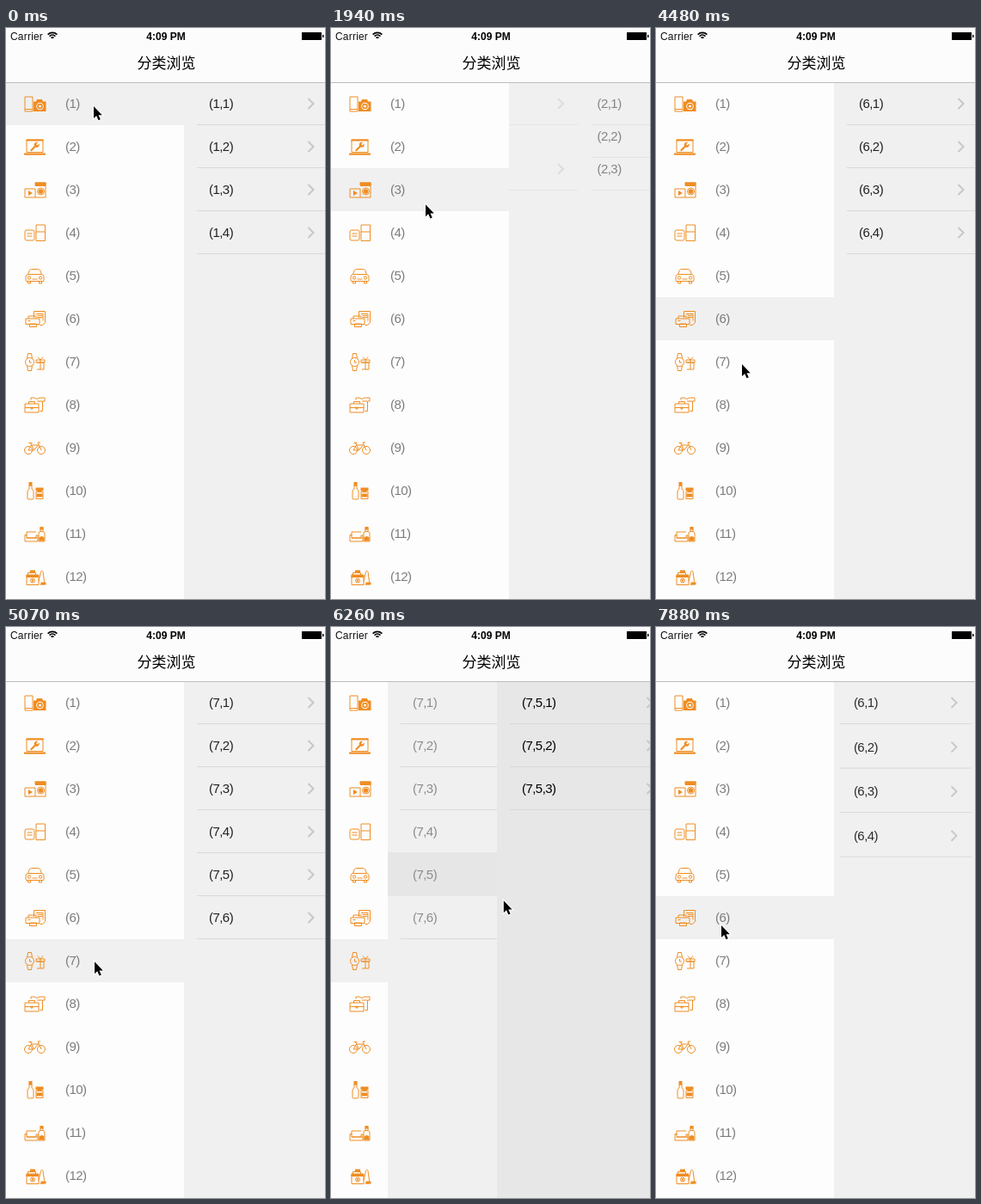
Write an HTML page with a canvas that moves like this. It is 371 px wide and 664 px high and loops after 8 s.

```html
<!DOCTYPE html>
<html lang="zh">
<head>
<meta charset="utf-8">
<style>
html, body { margin: 0; width: 371px; height: 664px; overflow: hidden; background: #fdfdfd; }
canvas { display: block; width: 371px; height: 664px; }
</style>
</head>
<body>
<canvas id="stage"></canvas>
<script>
const W = 371, H = 664, LOOP = 8000, ROW = 50, TOP = 63, PAGE = 168;
const ORANGE = '#ef8d22', SANS = '"Liberation Sans", Arial, sans-serif';
const canvas = document.getElementById('stage');
const ctx = canvas.getContext('2d');
const dpr = window.devicePixelRatio || 1;
canvas.width = W * dpr;
canvas.height = H * dpr;

const ring = (x, y, r) =>
  `M${x - r} ${y}a${r} ${r} 0 1 0 ${2 * r} 0a${r} ${r} 0 1 0 ${-2 * r} 0z`;

// Each icon is [outline, solid], centred on its row.
const ICONS = [
  ['M-11.5-8.5h9v17h-9zM-11.5 6h9',
   `M-1.5-3h3l1-2.5h6l1 2.5h3.5v11.5h-14.5z${ring(6, 2.5, 4.3)}${ring(6, 2.5, 3.3)}${ring(6, 2.5, 1.6)}`],
  ['M-9.5-8.5h19v14.500h-19zM-12 8.500h24',
   'M-10-9h20v2h-20zM-5.500 3.500l5-5c-1-3 1.500-5 4-4l-2 2 1.500 1.500 2-2c1 3-1.500 5-4 4l-5 5zM-12.500 7h25v2h-25z'],
  [`M-11.5-1.500h12v10h-12zM.5-8.500h12v17h-12M.5-5h12${ring(7, 1.5, 4)}`,
   `M-7.500.500l5 3-5 3zM0-9h13v3.500h-13z${ring(7, 1.5, 2.8)}`],
  ['M1.500-9.500h10.500v18.500h-10.500zM1.500-1.500h10.500M-9.500-3.500h7q2 0 2 2v8q0 2-2 2h-7q-2 0-2-2v-8q0-2 2-2zM-9 .500h6M-9 3.500h6', ''],
  [`M-8-2l2-5q.5-1 2-1h8q1.500 0 2 1l2 5q2.500.500 2.500 3v4q0 1-1 1h-19q-1 0-1-1v-4q0-2.500 2.500-3zh16M-8 6v2.500h3v-2.500M5 6v2.500h3v-2.500M-3 3.500h6${ring(-6.5, 2, 1.7)}${ring(6.5, 2, 1.7)}`, ''],
  ['M-1-1.500v-7.500h13v13l-3 3h-3M1.500-6h8v8M-10.500-.500h16v6.500h-16zM-7.500-.500v-3h9v3M-6 5.500h8v3.500h-8z',
   'M3-4.500h6v1h-6zM3-2.500h6v1h-6zM-8 1.500h3v1h-3z'],
  [`${ring(-6, 0, 5)}M-9-4l1-6h4l1 6M-9 4l1 6h4l1-6M-6-2.500v3h2.500M1.500-2.500h10v3h-10zM2.500.500h8v8h-8M6.500-2.500v11M6.500-2.500l-3-3.500M6.500-2.500l3-3.500`, ''],
  ['M-11.500-1.500h16v10h-16zM-11.500 3h16M-7-1.500v-2.500h7v2.500M-4.500 2v2.500h2v-2.500M-4.500-6v-2.500h4q2.500 3 6 0h6v4h-2.500v11.500h-3M2.500-4.500h6', ''],
  [`${ring(-7.5, 2.5, 4.5)}${ring(7.5, 2.5, 4.5)}M-7.500 2.500l3.500-6h8l-5 6h-6.500M-5-6l4 8.500M7.500 2.500l-4-9h3M-7-6h4`, ''],
  ['M-6.500-6.500v4q-2 1-2 3v8q0 1 1 1h5q1 0 1-1v-8q0-2-2-3v-4zM1.500.500h8v8.500h-8z',
   'M-7-10.500h4v4.500h-4zM1-4h9v3.500h-9zM3-.500h5v2h-5zM2 3h7v4h-7z'],
  ['M-9.500 2v-4.500h11M-11.500 1h2v3.500h11v-3h2v7h-15zM-9.500 4.500h13M5-2.500q-.5 1-.5 2v9h7v-9q0-2-2-2.500h-3zM6.500-3v-4h3v4',
   'M6-8.500h4v3.500h-4zM5 4q3-3 6 0v4h-6z'],
  [`M-9.500-2h14v11h-14zM-8-2v-3h9v3M4.500 5l2.500-11q1-3 2.500 0l1.500 11v3.500h-5${ring(-2.5, 4, 2.5)}`,
   `M-10-3h14.500v3.500h-14.500zM-5.500-8h6v2.500h-6zM7 6h6v3h-6z${ring(-2.5, 4, 1.3)}`]
].map(paths => paths.map(d => new Path2D(d)));

const ARROW = new Path2D('M0 0v14l3.200-3 2.300 5.200 2.300-1-2.300-5h4.300z');

// [time, menu row]; each menu row owns [label prefix, child count].
const PICKS = [[-LOOP, 1], [1000, 2], [1787, 3], [2520, 4], [3065, 5], [4010, 6], [4755, 7], [7623, 6]];
const CHILDREN = [, ['1', 4], ['2', 2], ['2', 3], ['4', 3], ['4', 4], ['6', 4], ['7', 6]];
// [time, x, y] of the pointer tip.
const POINTER = [
  [0, 102, 91], [60, 102, 91], [600, 106, 133], [1340, 106, 133], [1490, 109, 187],
  [1790, 109, 187], [1940, 110, 205], [2240, 109, 259], [2800, 109, 259], [3050, 107, 298],
  [3280, 107, 310], [3580, 105, 342], [4150, 105, 342], [4450, 100, 391], [5060, 100, 391],
  [5660, 265, 292], [6020, 265, 292], [6880, 36, 386], [7200, 36, 386], [7560, 76, 347], [8000, 76, 347]
];

const lerp = (a, b, p) => a + (b - a) * p;
const clamp = v => Math.max(0, Math.min(1, v));
const ease = (t, start, length = 300) => (1 - Math.cos(Math.PI * clamp((t - start) / length))) / 2;

function rect(x, y, w, h, color) {
  ctx.fillStyle = color;
  ctx.fillRect(x, y, w, h);
}

function text(str, x, y, font, color, spacing = 0, align = 'left') {
  ctx.font = font;
  ctx.fillStyle = color;
  ctx.letterSpacing = spacing + 'px';
  ctx.textAlign = align;
  ctx.fillText(str, x, y);
}

const label = (str, x, y, color) => text(str, x, y, '15px ' + SANS, color, -0.55);

function chevron(x, y) {
  ctx.strokeStyle = '#c7c7c9';
  ctx.lineWidth = 2;
  ctx.beginPath();
  ctx.moveTo(x - 3, y - 6);
  ctx.lineTo(x + 3, y);
  ctx.lineTo(x - 3, y + 6);
  ctx.stroke();
}

function list([prefix, count], x, options = {}) {
  const { width = PAGE, gap = ROW, alpha = 1, color = '#222', lead = 0, lines = 1, selected = -1 } = options;
  for (let i = 0; i < count; i++) {
    const y = 88 + i * gap;
    ctx.globalAlpha = alpha;
    label(`(${prefix},${i + 1})`, x + 29 - lead, y + 5, color);
    chevron(x + width - 20.5, y);
    ctx.globalAlpha = alpha * lines;
    if (i !== selected && i !== selected - 1) rect(x + 15, y + 24, width - 15, 1, '#d9d9d9');
  }
  ctx.globalAlpha = 1;
}

function menu(active) {
  rect(0, 0, W, H, '#fdfdfd');
  rect(0, TOP + (active - 1) * ROW, 207, ROW, '#f0f0f0');
  ctx.strokeStyle = ORANGE;
  ctx.lineWidth = 1;
  ICONS.forEach(([outline, solid], i) => {
    const y = 88 + i * ROW;
    label(`(${i + 1})`, 69, y + 5, '#7c7c7c');
    ctx.save();
    ctx.translate(33.500, y + 0.5);
    ctx.stroke(outline);
    ctx.fillStyle = ORANGE;
    ctx.fill(solid, 'evenodd');
    ctx.restore();
  });
}

function header() {
  rect(0, 0, W, TOP, '#fcfcfc');
  rect(0, TOP, W, 1, '#bdbdbd');
  text('Carrier', 5, 13.500, '12px ' + SANS, '#111', 0.2);
  text('4:09 PM', 186, 13.500, 'bold 12px ' + SANS, '#000', 0, 'center');
  text('分类浏览', 186.500, 47, '500 17px "Noto Sans CJK SC", "Noto Sans CJK", sans-serif', '#000', 0, 'center');
  ctx.strokeStyle = '#000';
  ctx.lineWidth = 1.700;
  for (const r of [2, 4.8, 7.6]) {
    ctx.beginPath();
    ctx.arc(54, 13, r, -Math.PI * 0.75, -Math.PI * 0.25);
    ctx.stroke();
  }
  rect(344, 5, 23, 9, '#000');
  rect(368, 8, 1.500, 3, '#000');
}

function pointer(t) {
  const k = Math.max(1, POINTER.findIndex(p => p[0] > t));
  const [t0, x0, y0] = POINTER[k - 1], [t1, x1, y1] = POINTER[k];
  const p = (t - t0) / (t1 - t0);
  ctx.save();
  ctx.translate(lerp(x0, x1, p), lerp(y0, y1, p));
  ctx.strokeStyle = '#fff';
  ctx.lineWidth = 2;
  ctx.stroke(ARROW);
  ctx.fillStyle = '#000';
  ctx.fill(ARROW);
  ctx.restore();
}

function pages(t, pick) {
  const [start, row] = PICKS[pick];
  const open = ease(t, 5756) - ease(t, 7010);
  const expanded = t > 5740 && t < 7010;
  const x = lerp(207, 66, open), third = lerp(375, 193, open);
  ctx.save();
  ctx.beginPath();
  ctx.rect(x, TOP, W - x, H - TOP);
  ctx.clip();
  rect(x, TOP, W - x, H - TOP, '#f0f0f0');

  const p = ease(t, start), next = CHILDREN[row];
  if (p < 1) {
    const old = PICKS[pick - 1][1], prev = CHILDREN[old];
    const side = row > old ? 1 : -1;
    const fit = (from, into) => (from[1] - 1) * ROW / (into[1] - 1);
    list(prev, x - side * PAGE * p, { gap: lerp(ROW, fit(next, prev), p), alpha: 1 - p });
    list(next, x + side * PAGE * (1 - p), {
      gap: lerp(fit(prev, next), ROW, p), alpha: p, lead: side * Math.min(7, 40 * (1 - p))
    });
  } else if (expanded) {
    rect(x, 262, W - x, 51, '#e6e6e6');
    list(next, x, { color: '#8c8c8c', lines: open, selected: 4 });
  } else {
    list(next, x);
  }
  if (open > 0) {
    rect(third, TOP, W, H, '#e7e7e7');
    list(['7,5', 3], third, { width: 198, color: '#000' });
  }
  ctx.restore();
}

function draw(now) {
  const t = now % LOOP;
  const pick = PICKS.filter(([time]) => time <= t).length - 1;
  ctx.setTransform(dpr, 0, 0, dpr, 0, 0);
  menu(PICKS[pick][1]);
  pages(t, pick);
  header();
  pointer(t);
  requestAnimationFrame(draw);
}
requestAnimationFrame(draw);
</script>
</body>
</html>
```
